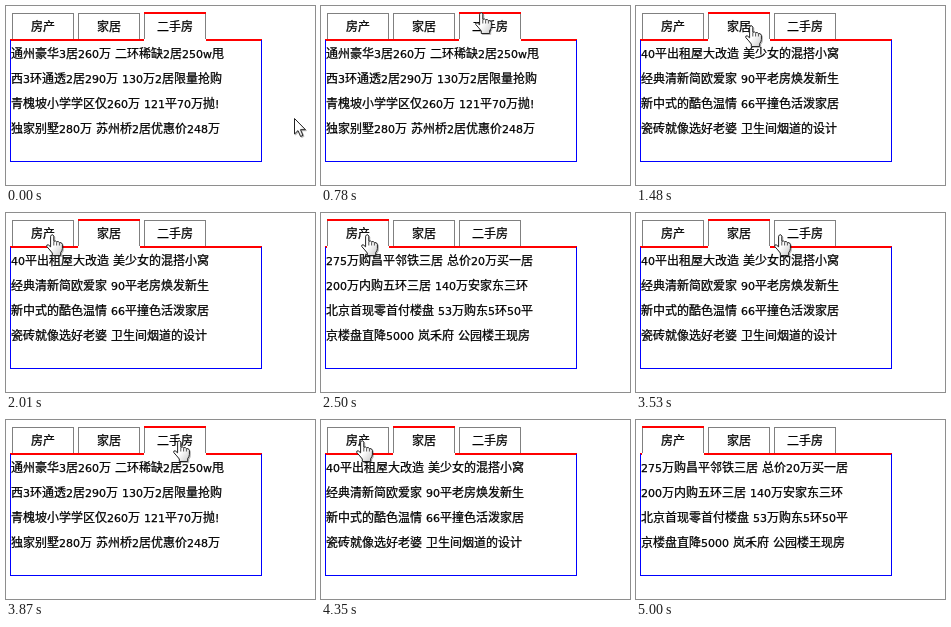
An HTML page for the animation above (5240 ms loop, 309x179 px).

```html
<!DOCTYPE html>
<html lang="zh-CN">
<head>
<meta charset="utf-8">
<title>Tabs</title>
<style>
html, body { margin: 0; width: 100%; height: 100%; overflow: hidden; background: #fff; }
svg { display: block; width: 309px; height: 179px; }
text { font: 12px "Noto Sans CJK SC", "Noto Sans CJK", sans-serif; fill: #000; stroke: #000; stroke-width: .25px; white-space: pre; }
.latin { font: 11px "DejaVu Sans", sans-serif; word-spacing: .5px; }
.cursor { filter: drop-shadow(1px 1px .6px #0004); }
.cursor path { fill: url(#shade); stroke: #222; stroke-width: 1; stroke-linejoin: round; }
.cursor path + path { fill: none; stroke: #555; }
</style>
</head>
<body>
<svg id="stage" viewBox="0 0 309 179">
  <linearGradient id="shade" x2="1" y2="1">
    <stop offset=".5" stop-color="#fff"/>
    <stop offset="1" stop-color="#c8c8c8"/>
  </linearGradient>
</svg>
<script>
const LOOP = 5240;
const TABS = [
  { x: 6, w: 62, label: '房产', lines: [
    '275万购昌平邻铁三居 总价20万买一居',
    '200万内购五环三居 140万安家东三环',
    '北京首现零首付楼盘 53万购东5环50平',
    '京楼盘直降5000 岚禾府 公园楼王现房'] },
  { x: 72, w: 62, label: '家居', lines: [
    '40平出租屋大改造 美少女的混搭小窝',
    '经典清新简欧爱家 90平老房焕发新生',
    '新中式的酷色温情 66平撞色活泼家居',
    '瓷砖就像选好老婆 卫生间烟道的设计'] },
  { x: 138, w: 62, label: '二手房', lines: [
    '通州豪华3居260万 二环稀缺2居250w甩',
    '西3环通透2居290万 130万2居限量抢购',
    '青槐坡小学学区仅260万 121平70万抛!',
    '独家别墅280万 苏州桥2居优惠价248万'] }
];

// [time, active tab]
const ACTIVE = [[0, 2], [1480, 1], [2500, 0], [3530, 1], [3870, 2], [4240, 1], [4540, 0]];

// [time, cursor, x, y]
const MOVES = [
  [0, 'arrow', 288, 112],
  [490, 'arrow', 293, 109], [550, 'arrow', 283, 94], [610, 'arrow', 255, 69],
  [670, 'arrow', 214, 42], [720, 'hand', 175, 15], [780, 'hand', 154, 6],
  [830, 'hand', 146, 9], [890, 'hand', 138, 12], [940, 'hand', 129, 14],
  [990, 'hand', 122, 16], [1050, 'hand', 114, 18], [1110, 'hand', 109, 19],
  [1790, 'hand', 101, 20], [1850, 'hand', 82, 20], [1900, 'hand', 64, 21],
  [1960, 'hand', 48, 21], [2010, 'hand', 40, 21],
  [2810, 'hand', 47, 21], [2870, 'hand', 65, 21], [2930, 'hand', 84, 20],
  [2990, 'hand', 100, 20], [3050, 'hand', 111, 20], [3120, 'hand', 119, 21],
  [3200, 'hand', 125, 21], [3280, 'hand', 129, 21],
  [3530, 'hand', 138, 21], [3590, 'hand', 150, 20], [3640, 'hand', 160, 20],
  [3690, 'hand', 167, 20],
  [3930, 'hand', 146, 20], [4000, 'hand', 104, 20], [4060, 'hand', 62, 20],
  [4240, 'hand', 52, 20], [4300, 'hand', 42, 20], [4350, 'hand', 35, 20],
  [4540, 'hand', 40, 21], [4600, 'arrow', 58, 36], [4660, 'arrow', 91, 57],
  [4720, 'arrow', 132, 82], [4770, 'arrow', 175, 108], [4830, 'arrow', 217, 133],
  [4890, 'arrow', 252, 153], [4950, 'arrow', 275, 169], [5000, '', 0, 0]
];

const stage = document.getElementById('stage');

function add(parent, tag, attrs = {}, content = '') {
  const el = document.createElementNS('http://www.w3.org/2000/svg', tag);
  for (const key in attrs) el.setAttribute(key, attrs[key]);
  el.textContent = content;
  return parent.appendChild(el);
}

const rect = (parent, x, y, width, height, fill) =>
  add(parent, 'rect', { x, y, width, height, fill });

function write(parent, x, y, words) {
  const el = add(parent, 'text', { x, y });
  for (const run of words.match(/[ -~]+|[^ -~]+/g))
    add(el, 'tspan', /[ -~]/.test(run[0]) ? { class: 'latin' } : {}, run);
}

function drawTab(parent, tab, on) {
  const { x, w } = tab;
  const top = on ? 6 : 7;
  rect(parent, x, top, w, on ? 29 : 26, '#fff');
  rect(parent, x, top, 1, 33 - top, '#808080');
  rect(parent, x + w - 1, top, 1, 33 - top, '#808080');
  rect(parent, x, top, w, on ? 2 : 1, on ? '#f00' : '#808080');
}

const frame = add(stage, 'g');
rect(frame, 4, 33, 252, 2, '#f00');
rect(frame, 4, 34, 1, 122, '#00f');
rect(frame, 255, 34, 1, 122, '#00f');
rect(frame, 4, 155, 252, 1, '#00f');
TABS.forEach(tab => drawTab(frame, tab, false));

const panels = TABS.map(tab => {
  const g = add(stage, 'g');
  drawTab(g, tab, true);
  tab.lines.forEach((line, i) => write(g, 5, 52 + 25 * i, line));
  return g;
});

TABS.forEach(tab => write(stage, tab.x + tab.w / 2 - tab.label.length * 6, 25, tab.label));

const cursors = {
  arrow: ['M.5 .5V16L4 12.6L6.6 18.5L9 17.4L6.5 11.7H11.5Z'],
  hand: [
    'M4.6 2.2Q6.2 -1 7.8 2.2V7.4Q9.4 6.2 10.6 7.8Q12.4 6.8 13.4 8.6Q15.7 8 16.4 10.4V14.5Q16.2 17 14.7 18.5V21.5H6.3V19Q4 16 .8 12.6Q.2 10.4 2.2 10.8L4.6 12.8Z',
    'M7.8 8V11.5M10.6 8.2V11.5M13.4 9V11.5'
  ]
};
for (const name in cursors) {
  const g = add(stage, 'g', { class: 'cursor' });
  cursors[name].forEach(d => add(g, 'path', { d }));
  cursors[name] = g;
}

const show = (el, on) => el.setAttribute('visibility', on ? 'visible' : 'hidden');
const latest = (steps, t) => steps.filter(step => step[0] <= t).pop();

function render(t) {
  const [, active] = latest(ACTIVE, t);
  panels.forEach((panel, i) => show(panel, i === active));
  const [, kind, x, y] = latest(MOVES, t);
  for (const name in cursors) {
    show(cursors[name], name === kind);
    cursors[name].setAttribute('transform', `translate(${x} ${y})`);
  }
}

const start = performance.now();
function tick() {
  render((performance.now() - start) % LOOP);
  requestAnimationFrame(tick);
}
tick();
</script>
</body>
</html>
```
